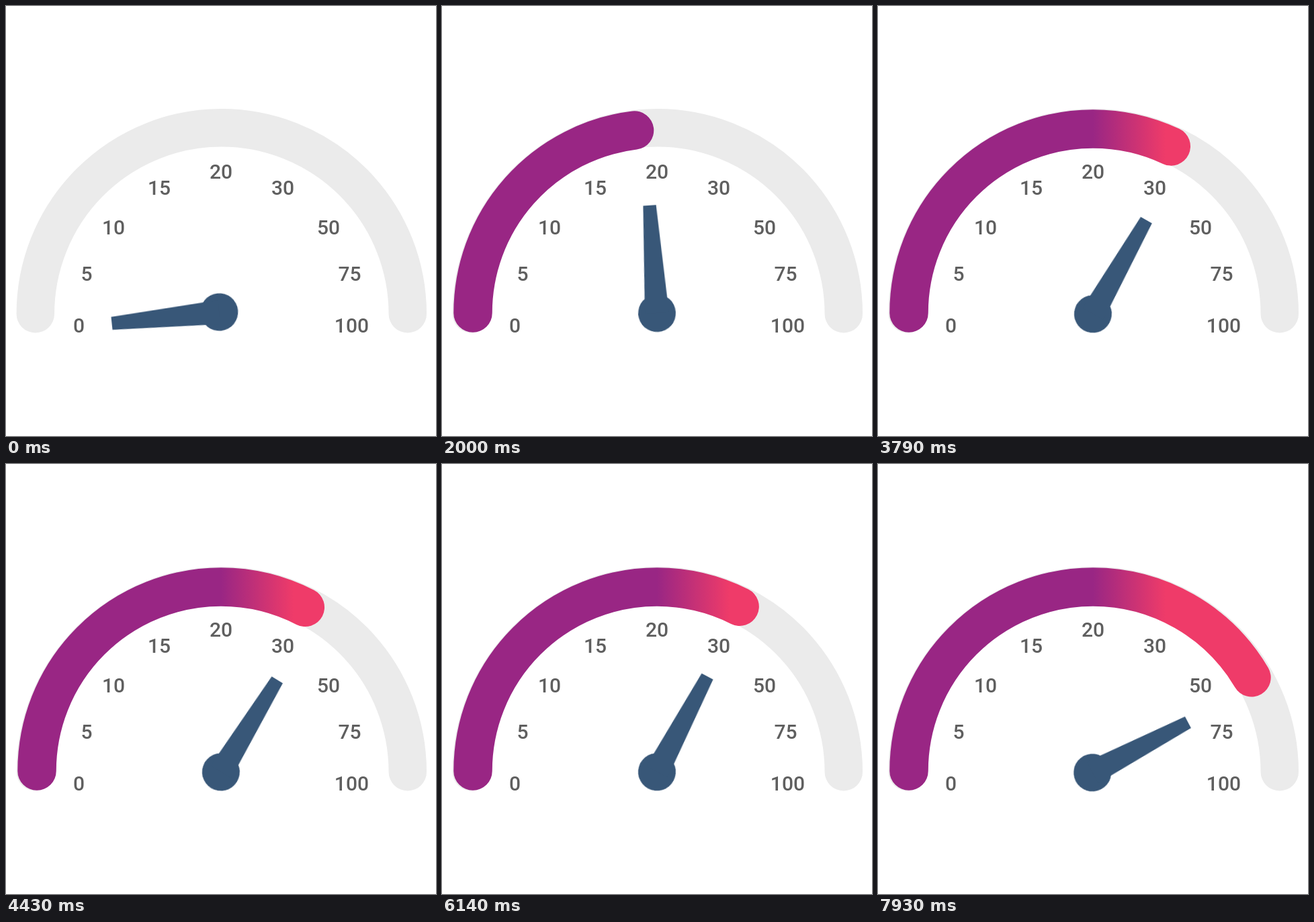
Write an HTML page that moves like this. It is 640x640 px and loops after 8 s.

```html
<!DOCTYPE html>
<html lang="en">
<head>
<meta charset="utf-8">
<title>Gauge</title>
<style>
  html, body { margin: 0; width: 100%; height: 100%; overflow: hidden; background: #fff; }
  svg { display: block; width: 100vw; height: 100vh; }
  .arc { fill: none; stroke-linecap: round; }
  #fill { stroke-dasharray: 180 400; }
  text { font: 500 30px Roboto, sans-serif; fill: #5f5f5f; }
</style>
</head>
<body>
<svg viewBox="0 0 640 640">
  <defs>
    <linearGradient id="heat" gradientUnits="userSpaceOnUse" x1="320" y1="0" x2="428" y2="0">
      <stop offset="0" stop-color="#992684"/>
      <stop offset="1" stop-color="#ef3b69"/>
    </linearGradient>
  </defs>
  <path class="arc" d="M43.8 458.2A277 277 0 0 1 597.8 458.2" stroke="#ebebeb" stroke-width="56.5"/>
  <path class="arc" id="fill" d="M46 457A274 274 0 0 1 594 457" pathLength="180" stroke="url(#heat)" stroke-width="57.5"/>
  <g id="labels"><text x="320" y="257" text-anchor="middle">20</text></g>
  <g id="needle" fill="#385778">
    <circle cx="-.3" cy="-2.1" r="28"/>
    <path d="M-.3 -20.1L-161.1 -11.8V7.6L-.3 15.9Z"/>
  </g>
</svg>
<script>
  const LOOP = 8000, FRAMES = 112;
  const byId = id => document.getElementById(id);

  // Labels mirror each other about the top one; x is the distance to their outer edge.
  function addPair(left, right, x, drop) {
    const label = (value, px, anchor) =>
      `<text x="${px}" y="${257 + drop}" text-anchor="${anchor}">${value}</text>`;
    byId('labels').innerHTML += label(left, 318 - x, 'start') + label(right, 322 + x, 'end');
  }
  addPair(15, 30, 107, 23.7);
  addPair(10, 50, 175, 83);
  addPair(5, 75, 206.5, 152);
  addPair(0, 100, 218, 228.5);

  // Turning points of the reading; a sweep below zero keeps the round cap hidden.
  const turns = [
    { at: 0, sweep: -0.5, angle: -6 },
    { at: 2600, sweep: 108, angle: 113.7, easing: 'ease-out' },
    { at: 4400, sweep: 116.5, angle: 120.8 },
    { at: 4700, sweep: 124, angle: 127.5 },
    { at: 5480, sweep: 90, angle: 92 },
    { at: 7250, sweep: 161.3, angle: 161 },
    { at: LOOP, sweep: 148.2, angle: 151.3 }
  ];

  function play(id, styleOf) {
    const keyframes = turns.map(turn => ({
      offset: turn.at / LOOP,
      easing: turn.easing || 'linear',
      ...styleOf(turn)
    }));
    byId(id).animate(keyframes, {
      duration: LOOP, iterations: Infinity, delay: -3, easing: `steps(${FRAMES})`
    });
  }
  play('fill', ({ sweep }) => ({ strokeDashoffset: `${180 - sweep}px` }));
  play('needle', ({ angle }) => ({ transform: `translate(317.9px, 457.6px) rotate(${angle}deg)` }));
</script>
</body>
</html>
```
